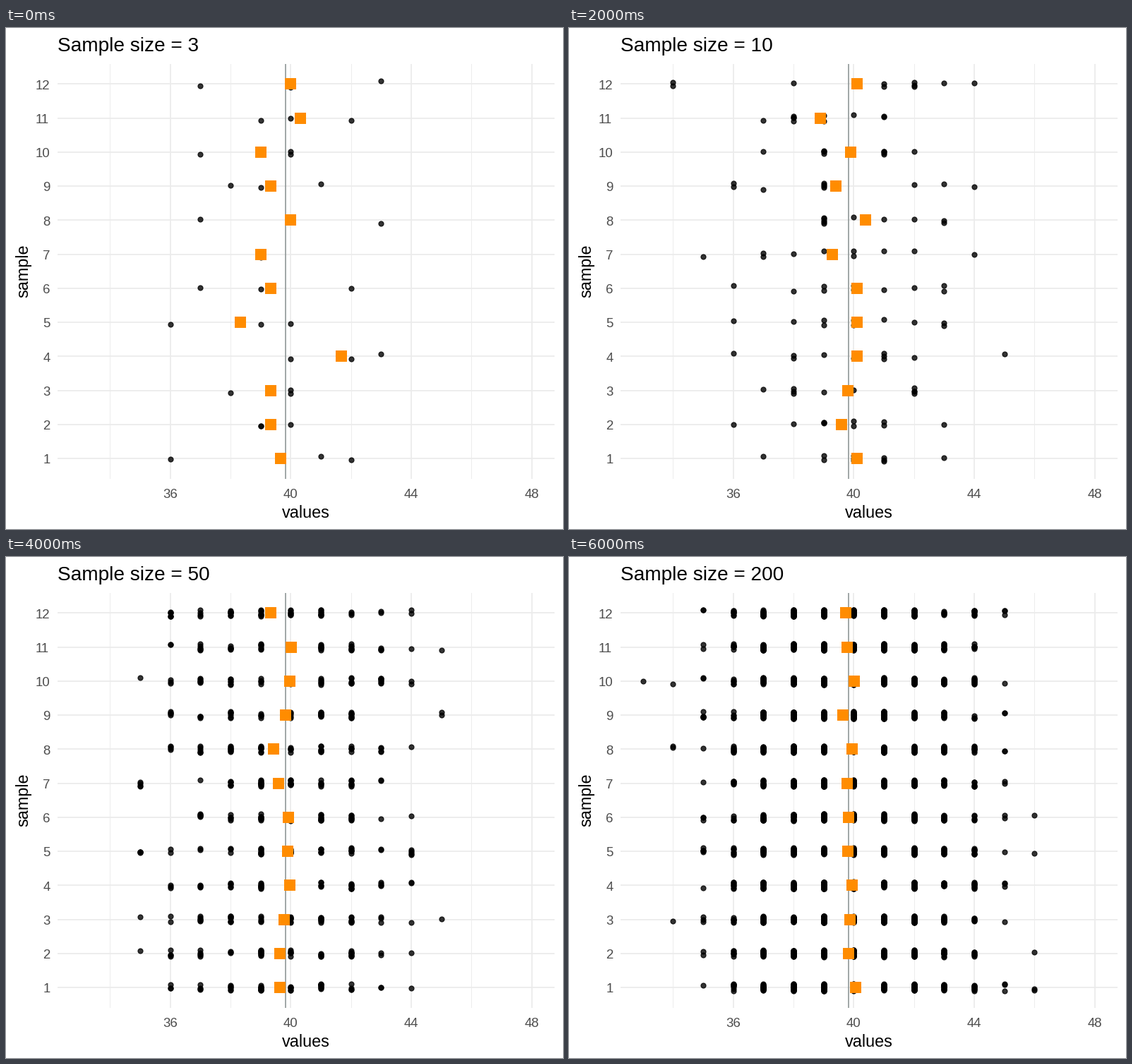
Recreate the animation shown at these times as a matplotlib script. Size 789x710 px, loop 7 s.

```python
import numpy as np
import matplotlib.pyplot as plt
from matplotlib.animation import FuncAnimation

W, H, DPI = 789, 710, 100
LEFT, RIGHT, TOP, BOTTOM = 72.6, 776.7, 50.5, 638.9
X_MIN, X_MAX, Y_MIN, Y_MAX = 32.25, 48.75, 0.4, 12.6
ROWS = np.arange(12, 0, -1)
POP_MEAN, JITTER = 39.83, 0.1
GRID, TICK = "#EBEBEB", "#4D4D4D"

# Sample means for each size, from row 12 down to row 1
MEANS = {
    3: [40, 40.33, 39, 39.33, 40, 39, 39.33, 38.33, 41.67, 39.33, 39.33, 39.67],
    5: [39.8, 39.4, 40.8, 40.2, 39.4, 39.4, 38.6, 39.4, 41, 41, 41.4, 39.8],
    10: [40.1, 38.9, 39.9, 39.4, 40.4, 39.3, 40.1, 40.1, 40.1, 39.8, 39.6, 40.1],
    20: [39.75, 39.25, 39.95, 40.25, 39.55, 40.55, 39.9, 39.85, 40.15, 39.45, 39.7, 38.5],
    50: [39.34, 40.02, 39.98, 39.82, 39.44, 39.6, 39.92, 39.9, 39.96, 39.78, 39.64, 39.64],
    100: [39.86, 39.7, 40.02, 39.77, 39.9, 39.54, 39.91, 40, 39.96, 39.73, 40.09, 39.91],
    200: [39.74, 39.78, 40.02, 39.65, 39.94, 39.79, 39.83, 39.81, 39.95, 39.87, 39.84, 40.07],
}

plt.rcParams["font.family"] = "Liberation Sans"


def pt(px):
    return px * 72 / DPI


def draw_sample(rng, size, mean):
    """Redraw from a mix of two normal groups until the sample has this mean."""
    while True:
        upper = rng.random(size) < 0.38
        values = np.where(upper, rng.normal(41.8, 1.4, size), rng.normal(38.6, 1.6, size))
        values = np.rint(values).clip(33, 48)
        if values.sum() == round(mean * size):
            return values


def make_scene(size):
    rng = np.random.default_rng(size)
    values = np.concatenate([draw_sample(rng, size, m) for m in MEANS[size]])
    heights = np.repeat(ROWS, size) + rng.uniform(-JITTER, JITTER, values.size)
    return (size, np.column_stack([MEANS[size], ROWS]),
            np.column_stack([values, heights]))


scenes = [make_scene(size) for size in MEANS]

fig = plt.figure(figsize=(W / DPI, H / DPI), dpi=DPI, facecolor="white")
ax = fig.add_axes([LEFT / W, 1 - BOTTOM / H, (RIGHT - LEFT) / W, (BOTTOM - TOP) / H])
ax.set(xlim=(X_MIN, X_MAX), ylim=(Y_MIN, Y_MAX))
ax.axis("off")


def label(x, y, text, px, color="black", ha="center", **kw):
    return fig.text(x / W, 1 - y / H, text, fontsize=pt(px), color=color,
                    ha=ha, va="baseline", **kw)


def x_px(value):
    return LEFT + (value - X_MIN) / (X_MAX - X_MIN) * (RIGHT - LEFT)


def y_px(row):
    return BOTTOM - (row - Y_MIN) / (Y_MAX - Y_MIN) * (BOTTOM - TOP)


# Grid and axis labels
for value in range(34, 48, 4):
    ax.axvline(value, color=GRID, lw=pt(0.9), zorder=0)
for row in ROWS:
    ax.axhline(row, color=GRID, lw=pt(1.78), zorder=1)
    text = str(row)
    label(62.6 - 10.38 * len(text), y_px(row) + 7.3, text, 18.67, TICK, ha="left")
for value in range(36, 49, 4):
    ax.axvline(value, color=GRID, lw=pt(1.78), zorder=1)
    label(x_px(value), 665.8, str(value), 18.67, TICK)

label((LEFT + RIGHT) / 2, 694, "values", 23.33)
label(31, (TOP + BOTTOM) / 2, "sample", 23.33, rotation=90, rotation_mode="anchor")
title = label(73, 33.2, "", 28, ha="left")

# Moving parts
ink = (0, 0, 0, 0.8)
dots = ax.scatter([], [], s=pt(7) ** 2, facecolors=[ink], edgecolors=[ink],
                  linewidths=pt(1.25), zorder=2)
ax.axvline(POP_MEAN, color="#8C9494", lw=pt(1.6), zorder=3)
squares = ax.scatter([], [], s=pt(15.6) ** 2, marker="s", color="#FF8C00",
                     linewidths=0, zorder=4)


def draw(i):
    size, means, points = scenes[i]
    title.set_text(f"Sample size = {size}")
    dots.set_offsets(points)
    squares.set_offsets(means)
    return title, dots, squares


anim = FuncAnimation(fig, draw, frames=len(scenes), init_func=lambda: draw(0),
                     interval=1000, repeat=True, repeat_delay=0)
plt.show()
```
